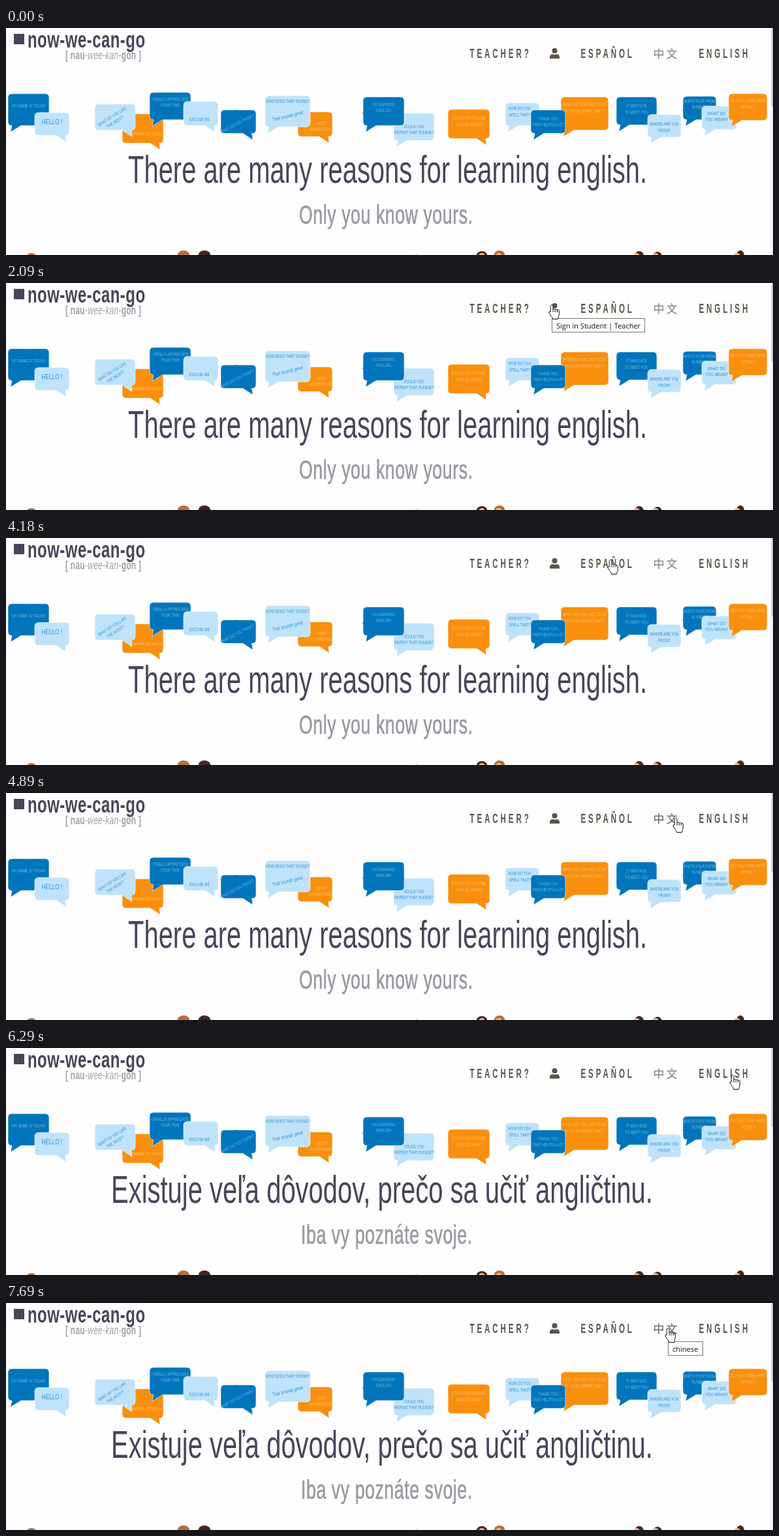
Recreate the animation shown at these times as an HTML page. Size 1175 by 349 pixels, loop 8000 ms.

```html
<!DOCTYPE html>
<html lang="en">
<head>
<meta charset="utf-8">
<title>Language switch</title>
<style>
  html, body { margin: 0; width: 1175px; height: 349px; overflow: hidden; background: #fefefe; }
  svg { display: block; }
  text { font-family: "Liberation Sans", Arial, sans-serif; white-space: pre; }
  .brand { font-size: 36px; font-weight: 700; fill: #4a4458; letter-spacing: .7px; }
  .say { font-size: 18px; fill: #a3a0a8; letter-spacing: .4px; }
  .nav { font-size: 21px; font-weight: 700; fill: #5c5449; letter-spacing: 7.1px; }
  .cjk { font: 300 17px "Noto Sans CJK SC", "Noto Sans CJK", sans-serif; letter-spacing: 3px; fill: #777; }
  .cjk.hover { fill: #5c5449; }
  .title { font-size: 60px; fill: #4a4458; }
  .sub { font-size: 40px; fill: #9b98a0; stroke: #9b98a0; stroke-width: .7px; letter-spacing: .9px; }
  .tip text { font: 11px "Open Sans", sans-serif; fill: #111; }
  .tip rect { fill: #fff; stroke: #767676; }
  .note { text-anchor: middle; }
  .cursor { fill: #fff; stroke: #111; stroke-linejoin: round; }
</style>
</head>
<body>
<svg id="stage" width="1175" height="349" viewBox="0 0 1175 349">
  <filter id="rough">
    <feTurbulence type="fractalNoise" baseFrequency=".12" numOctaves="2" seed="4"/>
    <feDisplacementMap in="SourceGraphic" scale="1.5" xChannelSelector="R" yChannelSelector="G"/>
  </filter>

  <rect x="12" y="9" width="16" height="16" fill="#4a4458"/>
  <text class="brand" transform="translate(33 30) scale(.666 1)">now-we-can-go</text>
  <text class="say" transform="translate(91 48) scale(.666 1)"><tspan font-weight="700">[ nau</tspan>-<tspan font-style="italic">wee</tspan>-<tspan font-style="italic">kan</tspan>-<tspan font-weight="700">goh ]</tspan></text>

  <text class="nav" transform="translate(710.5 46) scale(.55 1)">TEACHER?</text>
  <text class="nav" transform="translate(880.5 46) scale(.55 1)">ESPAÑOL</text>
  <text class="nav" transform="translate(1061.5 46) scale(.55 1)">ENGLISH</text>
  <text class="cjk" id="chinese" x="991.5" y="45.5">中文</text>
  <g fill="#5c5449">
    <circle cx="840.5" cy="35" r="4.1"/>
    <path d="M833 47v-2.200c0-3 2-4.600 4.500-4.600q3 1.400 6 0c2.500 0 4.500 1.600 4.500 4.600v2.200z"/>
  </g>

  <g id="bubbles"></g>
  <g id="heads"></g>

  <g id="english">
    <text class="title" transform="translate(187 238) scale(.666 1)">There are many reasons for learning english.</text>
    <text class="sub" transform="translate(449 301) scale(.666 1)">Only you know yours.</text>
  </g>
  <g id="slovak">
    <text class="title" transform="translate(161 238) scale(.666 1)">Existuje veľa dôvodov, prečo sa učiť angličtinu.</text>
    <text class="sub" transform="translate(452 301) scale(.666 1)">Iba vy poznáte svoje.</text>
  </g>

  <path d="M1172 0h3v349h-3z" fill="#f1f1f1"/>
  <path d="M1173 0h2v121h-2z" fill="#c6c6c6"/>

  <g class="tip" id="signTip"><rect x="836.5" y="54.5" width="142" height="21"/><text x="843" y="70">Sign in Student | Teacher</text></g>
  <g class="tip" id="chineseTip"><rect x="1014.5" y="59.5" width="53" height="21"/><text x="1021" y="75">chinese</text></g>

  <path class="cursor" id="arrow" d="M.5 .5v16l3.700-3.600 2.600 5.600 2.300-1-2.500-5.500h5.200z"/>
  <path class="cursor" id="hand" d="M5 .7c1.200 0 2 .8 2 2V8c0-1.300 3-1.300 3.200 .3c.5-1.200 3-1 3.100 .6c.5-.9 3-.6 3 1.400V15c0 3-1.600 4-1.800 7.500H6.500c0-2-1.500-3.500-2.700-5.300L1 13c-.9-1.600 1.200-2.800 2.200-1.400V2.700c0-1.200 .7-2 1.800-2zM7 8v4M10.200 8.500v3.500M13.300 9v3"/>
</svg>

<script>
const $ = id => document.getElementById(id);

function add(parent, tag, attrs, content = '') {
  const el = document.createElementNS('http://www.w3.org/2000/svg', tag);
  for (const key in attrs) el.setAttribute(key, attrs[key]);
  el.textContent = content;
  parent.append(el);
}

const BLUE = ['#0474bb', '#6fb6e4'], LIGHT = ['#bfe3fb', '#2f92cd'], ORANGE = ['#f98f0c', '#ffc06c'];

function bubble([fill, ink], x, y, w, h, tail, lines, { size = 7, turn = 0, dx = 0, dy = 0 } = {}) {
  const right = x + w, bottom = y + h;
  const base = tail === 'left' ? x + 6 : right - 20;
  const tip = tail === 'left' ? x + 4 : right - 5;
  add($('bubbles'), 'path', {
    fill, stroke: '#fff', 'stroke-width': .6, filter: 'url(#rough)',
    d: `M${x + 6} ${y}H${right - 6}q6 0 6 6V${bottom - 6}q0 6-6 6H${base + 14}L${tip} ${bottom + 10}` +
       `L${base} ${bottom}q-6 0-6-6V${y + 6}q0-6 6-6z`.replace(/^L.*?q-6 0-6-6/, `L${base} ${bottom}H${x + 6}q-6 0-6-6`)
  });
  lines.split('/').forEach((line, i, all) => add($('bubbles'), 'text', {
    class: 'note', fill: ink, 'font-size': size, y: (i - (all.length - 1) / 2) * 9.5 + 2.5,
    transform: `translate(${x + w / 2 + dx} ${y + h / 2 + dy}) rotate(${turn}) scale(.75 1)`
  }, line));
}

bubble(BLUE, 3, 101, 63, 49, 'left', 'MY NAME IS TOLVIN', { dy: -6 });
bubble(LIGHT, 44, 130, 53, 35, 'right', 'HELLO !', { size: 11, dy: -2 });
bubble(ORANGE, 178, 132, 63, 45, 'right', 'THANKS SO MUCH', { dx: 5, dy: 8 });
bubble(LIGHT, 136, 117, 62, 40, 'right', 'WHAT DO YOU LIKE/THE MOST?', { turn: -32, dx: -2, dy: 3 });
bubble(BLUE, 220, 99, 63, 42, 'left', 'I REALLY APPRECIATE/YOUR TIME', { dy: -6 });
bubble(LIGHT, 272, 113, 53, 37, 'right', 'EXCUSE ME', { dx: -2, dy: 9 });
bubble(BLUE, 329, 126, 54, 36, 'right', 'WHAT DO YOU THINK?', { turn: -27, dx: -2, dy: 3 });
bubble(ORANGE, 447, 129, 53, 38, 'right', "I DON'T/UNDERSTAND", { dx: 9, dy: 3 });
bubble(LIGHT, 397, 104, 69, 48, 'left', 'HOW DOES THAT SOUND?', { dy: -16 });
add($('bubbles'), 'text', {
  class: 'note', fill: LIGHT[1], 'font-size': 8, 'font-style': 'italic',
  transform: 'translate(432 138) rotate(-14) scale(.75 1)'
}, 'That sounds great');
bubble(LIGHT, 594, 131, 62, 42, 'left', 'COULD YOU/REPEAT THAT PLEASE?', { dy: 4 });
bubble(BLUE, 547, 106, 63, 44, 'left', "I'M LEARNING/ENGLISH", { dy: -6 });
bubble(ORANGE, 677, 125, 64, 45, 'right', 'COULD YOU PLEASE/TALK SLOWER?', { dy: -4 });
bubble(ORANGE, 850, 106, 73, 51, 'left', 'WHAT DO YOU LIKE TO DO/IN YOUR SPARE TIME ?', { dy: -9 });
bubble(LIGHT, 765, 115, 52, 35, 'left', 'HOW DO YOU/SPELL THAT?', { dx: -4, dy: -4 });
bubble(BLUE, 804, 126, 53, 36, 'left', 'THANK YOU/THAT HELPS A LOT');
bubble(BLUE, 935, 106, 62, 43, 'left', 'IT WAS NICE/TO MEET YOU', { dy: -3 });
bubble(LIGHT, 983, 133, 51, 35, 'left', 'WHERE ARE YOU/FROM?', { dy: 2 });
bubble(BLUE, 1037, 105, 51, 36, 'left', "WHAT'S YOUR PHONE/NUMBER?", { size: 6.5, dy: -6 });
bubble(LIGHT, 1066, 120, 53, 36, 'left', 'WHAT DO/YOU MEAN?', { size: 8, dx: -4, dy: -2 });
bubble(ORANGE, 1107, 101, 59, 41, 'left', 'DO YOU COME HERE/OFTEN ?', { dy: -5 });

// Tops of the figures just below the fold
function head(cx, top, rx, fill, skinX) {
  add($('heads'), 'ellipse', { cx, cy: top + 8, rx, ry: 8, fill });
  if (skinX) add($('heads'), 'ellipse', { cx: skinX, cy: 351, rx: 5, ry: 5, fill: '#efb587' });
}
const DARK = '#44271e', BROWN = '#b96f3c';
head(39, 346, 8, BROWN);
head(272, 342, 9.5, BROWN);
head(304, 342, 9.5, DARK);
head(629, 347, 4, '#dedede');
head(729, 343, 8.5, DARK, 729);
head(756, 342, 8.5, BROWN, 755);
head(970, 343, 7, DARK, 966);
head(998, 344, 7, DARK, 995);
head(1125, 342, 6, DARK, 1120);

// Start time, pointer shape and top left corner
const POINTER = [
  [700, 'arrow', 877, 89],
  [1390, 'hand', 831, 33],
  [3480, 'arrow', 858, 41],
  [4180, 'hand', 921, 33],
  [4890, 'hand', 1021, 38],
  [5590, 'hand', 1126, 41],
  [6290, 'hand', 1108, 41],
  [6990, 'hand', 1010, 37],
  [7690, 'hand', 1009, 38]
];

const show = (id, on) => $(id).setAttribute('visibility', on ? 'visible' : 'hidden');

function draw() {
  const t = performance.now() % 8000;
  const [, shape, x, y] = POINTER.filter(step => step[0] <= t).pop() || [];
  for (const id of ['arrow', 'hand']) show(id, id === shape);
  if (shape) $(shape).setAttribute('transform', `translate(${x} ${y})`);
  show('signTip', t >= 2090 && t < 3480);
  show('chineseTip', t >= 7690);
  show('english', t < 5590);
  show('slovak', t >= 5590);
  $('chinese').classList.toggle('hover', t >= 4890 && t < 5590 || t >= 6990);
  requestAnimationFrame(draw);
}
draw();
</script>
</body>
</html>
```
